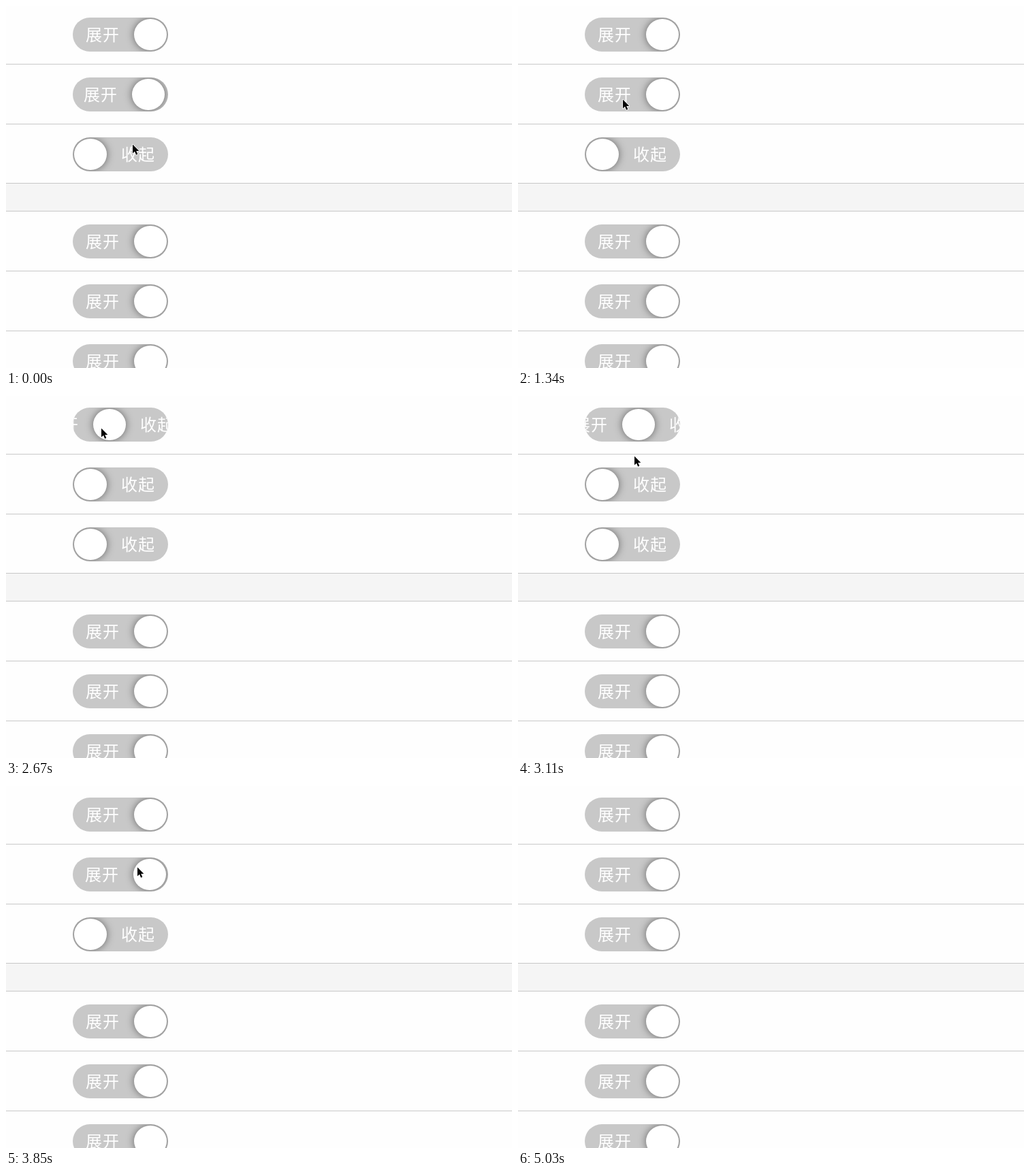
Write an HTML page that moves like this. It is 743 px wide and 532 px high and loops after 5480 ms.

```html
<!DOCTYPE html>
<html lang="zh">
<head>
<meta charset="utf-8">
<style>
  html, body { margin: 0; width: 100%; height: 100%; overflow: hidden; background: #fefefe; }
  #stage { position: relative; width: 743px; height: 532px; overflow: hidden; }
  .row { box-sizing: border-box; height: 88px; padding: 17px 98px; border-bottom: 1px solid #c8c8c8; }
  .row { position: absolute; width: 100%; transform: translateY(-2px); padding-top: 19px; }
  .band {
    position: absolute; top: 260px; width: 100%; height: 40px;
    border: solid #c8c8c8; border-width: 1px 0; background: #f5f5f5;
  }
  .switch {
    position: relative; width: 140px; height: 50px;
    border-radius: 25px; overflow: hidden; background: #c8c8c8;
    font: 300 24px/48px "Noto Sans CJK SC", "Noto Sans CJK", sans-serif;
    letter-spacing: 1px; color: #fff;
  }
  .track * { position: absolute; white-space: nowrap; }
  .on { left: -69px; }
  .off { left: 71px; }
  .knob {
    left: 2px; top: 2px; width: 48px; height: 46px; border-radius: 50%;
    background: #fff; box-shadow: 0 0 12px rgba(0, 0, 0, .5);
  }
  #cursor { position: absolute; left: 0; top: 0; overflow: visible; }
</style>
</head>
<body>
<div id="stage">
  <svg id="cursor" width="13" height="20">
    <path d="M0 0V16L3.7 12.6L6.3 18.6L8.9 17.5L6.4 11.6H11.4Z" transform="translate(1 1.5) scale(.82)"
          stroke="#fff" stroke-width="2" paint-order="stroke" stroke-linejoin="round"/>
  </svg>
</div>
<script>
const LOOP = 5480, TICK = LOOP / 37.05, TRAVEL = 88, SLIDE = 2;
const stage = document.getElementById('stage');
const cursor = document.getElementById('cursor');

function add(className, html = '') {
  const el = document.createElement('div');
  el.className = className;
  el.innerHTML = html;
  stage.insertBefore(el, cursor);
  return el;
}

const tracks = [];
for (let i = 0; i < 6; i++) {
  const row = add('row', `<div class="switch"><div class="track">
    <span class="on">展开</span><span class="off">收起</span><div class="knob"></div>
  </div></div>`);
  row.style.top = 88 * i + (i > 2 ? 40 : 0) + 'px';
  tracks.push(row.querySelector('.track'));
}
add('band');

// Ticks at which each of the upper switches flips; all end up switched on.
const flips = [[17.2, 20.3], [-1.54, 12.58, 24.3], [2.6, 6.5, 30.5]];

// Places where the pointer rests: arrival, departure, x, y.
const stops = [
  [0, 0, 185, 202], [1, 3, 176, 221], [5, 7, 169, 221], [10, 13, 152, 129],
  [18, 20, 139, 46], [23, 26, 192, 118], [29, 31, 188, 226], [33, 34, 527, 461]
];

// CSS "ease": cubic-bezier(.25, .1, .25, 1)
function ease(x) {
  if (x <= 0) return 0;
  if (x >= 1) return 1;
  const curve = (s, a, b) => 3 * s * (1 - s) ** 2 * a + 3 * s * s * (1 - s) * b + s ** 3;
  let lo = 0, hi = 1;
  for (let i = 0; i < 20; i++) {
    const mid = (lo + hi) / 2;
    if (curve(mid, .25, .25) < x) lo = mid; else hi = mid;
  }
  return curve(lo, .1, 1);
}

// 1 is on (knob right), 0 is off; the last flip always turns the switch on.
function switchPosition(ticks, now) {
  return ticks.reduce((position, start, i) => {
    const direction = (ticks.length - i) % 2 ? 1 : -1;
    return position + direction * ease((now - start) / SLIDE);
  }, ticks.length % 2 ? 0 : 1);
}

function pointerAt(now) {
  let [, left, x, y] = stops[0];
  for (const [arrive, leave, toX, toY] of stops) {
    const k = arrive > left ? ease((now - left) / (arrive - left)) : 1;
    x += (toX - x) * k;
    y += (toY - y) * k;
    left = leave;
  }
  return [Math.round(x), Math.round(y)];
}

function draw() {
  // The picture advances in discrete ticks.
  const now = Math.floor(performance.now() % LOOP / TICK);
  tracks.forEach((track, i) => {
    const shift = Math.round(TRAVEL * switchPosition(flips[i] || [], now));
    track.style.transform = `translateX(${shift}px)`;
  });
  const [x, y] = pointerAt(now);
  cursor.style.transform = `translate(${x}px, ${y}px)`;
  cursor.style.visibility = now < 34 ? 'visible' : 'hidden';
  requestAnimationFrame(draw);
}
draw();
</script>
</body>
</html>
```
